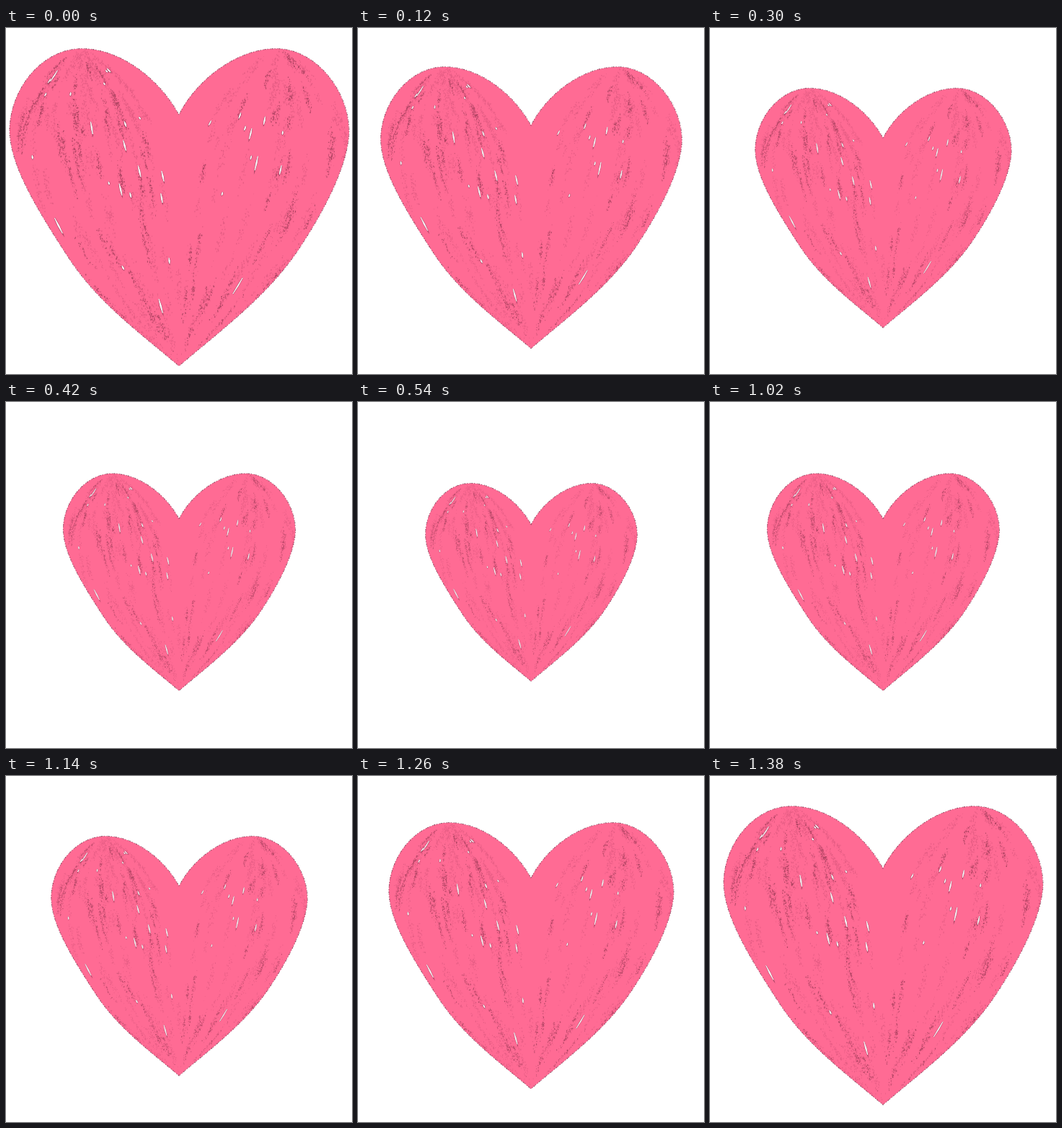
An HTML page with a canvas for the animation above (1.44 s loop, 480x479 px).

```html
<!DOCTYPE html>
<html>
<head>
<meta charset="utf-8">
<style>
html, body { margin: 0; width: 100%; height: 100%; overflow: hidden; background: #fff; }
canvas { display: block; }
</style>
</head>
<body>
<canvas id="stage" width="480" height="479"></canvas>
<script>
const ctx = document.getElementById('stage').getContext('2d');
const LOOP = 1440, STEP = 60, CX = 240.4, CY = 251.7;

const heart = new Path2D(
  'M240 120C214 72 160 28.5 105 28.5C50 28.5 4 85 5 145C7 192 42 250 90 323C130 382 188 424 240 468' +
  'C295 421 362 372 405 308C440 256 474 192 476 145C477 88 430 28.5 375 28.5C320 28.5 264 72 240 120Z');

let seed = 11;
const random = () => (seed = seed * 16807 % 2147483647) / 2147483647;
const between = (a, b) => a + (b - a) * random();
const spread = size => (random() + random() + random() - 1.5) * size;

// Crayon strokes fan out from the top of a lobe and meet again at the tip.
function strokePoint({ left, bulge }, t) {
  const u = 1 - t, a = u * u * u, b = 3 * u * u * t, c = 3 * u * t * t, d = t * t * t;
  const x = 103 * a + (100 + bulge) * (b + c) + 240 * d;
  return [left ? x : 480 - x, 25 * a + 110 * b + 270 * c + 468 * d];
}

const randomStroke = leftShare => ({ left: random() < leftShare, bulge: between(-140, 145) });

function addGrains(path, stroke, t, length, count, width) {
  for (let i = 0; i < count; i++) {
    const [x, y] = strokePoint(stroke, t + spread(length / 450));
    path.rect(x + spread(width), y, between(.6, 1.5), between(.8, 2.4));
  }
}

function addGap(path, stroke, t, length) {
  const [x0, y0] = strokePoint(stroke, t);
  const [x1, y1] = strokePoint(stroke, t + length / 450);
  const mx = (x0 + x1) / 2, my = (y0 + y1) / 2;
  path.moveTo(x0, y0);
  path.quadraticCurveTo(mx + 1.8, my, x1, y1);
  path.quadraticCurveTo(mx - 1.4, my + 1, x0, y0);
}

const dark = new Path2D(), faint = new Path2D(), gaps = new Path2D();
for (let i = 0; i < 230; i++) {
  const stroke = randomStroke(.6), t = between(.06, .93), length = between(12, 34);
  addGrains(faint, stroke, t, length, length * 1.1, 4);
  if (i % 3 == 0) addGrains(dark, stroke, t, length, length * 1.1, 2.6);
}
for (let i = 0; i < 34; i++) {
  const size = random();
  addGap(gaps, randomStroke(.72), between(.1, .85), 4 + 20 * size * size);
}

// The heart recedes for 13 steps, then returns a little faster.
function scaleAt(step) {
  const depth = Math.min(step, Math.max(24 - step, 32.5 - 1.5 * step));
  return 1 / (1 + .0625 * depth + .0005 * depth * depth);
}

function draw(time) {
  const scale = scaleAt(Math.floor(time % LOOP / STEP));
  ctx.setTransform(1, 0, 0, 1, 0, 0);
  ctx.fillStyle = '#fff';
  ctx.fillRect(0, 0, 480, 479);
  ctx.setTransform(scale, 0, 0, scale, CX * (1 - scale), CY * (1 - scale));

  ctx.fillStyle = '#ff6b94';
  ctx.fill(heart);
  ctx.save();
  ctx.clip(heart);
  ctx.fillStyle = 'rgba(165,55,90,.28)';
  ctx.fill(faint);
  ctx.fillStyle = 'rgba(120,40,65,.55)';
  ctx.fill(dark);

  ctx.lineWidth = 1.8;
  ctx.strokeStyle = 'rgba(110,40,65,.6)';
  ctx.stroke(gaps);
  ctx.fillStyle = ctx.strokeStyle = '#fff';
  ctx.lineWidth = .8;
  ctx.fill(gaps);
  ctx.stroke(gaps);
  ctx.restore();

  ctx.save();
  ctx.lineWidth = 1.1 / scale;
  ctx.setLineDash([1, 2, 2, 1, 1, 3].map(dash => dash / scale));
  ctx.strokeStyle = 'rgba(100,40,62,.7)';
  ctx.stroke(heart);
  ctx.restore();
}

function tick() {
  draw(performance.now());
  requestAnimationFrame(tick);
}
tick();
</script>
</body>
</html>
```
